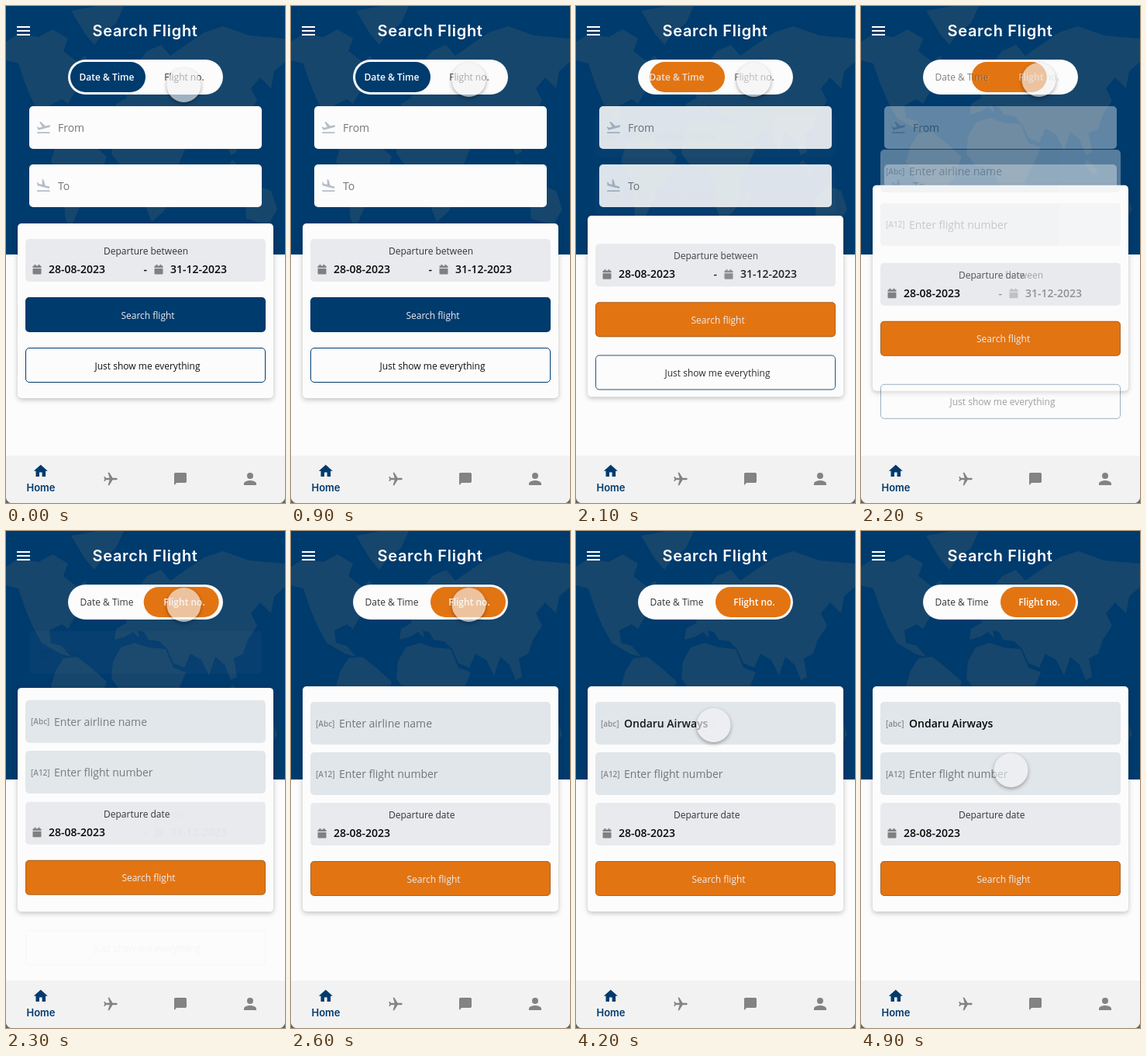
These frames come from a looping animation (360 px wide and 640 px high, 5 s). An HTML page:

```html
<!DOCTYPE html>
<html lang="en">
<head>
<meta charset="utf-8">
<title>Search Flight</title>
<style>
  html, body { margin: 0; width: 100%; height: 100%; overflow: hidden; background: #666; }
  #stage { position: relative; width: 360px; height: 640px; overflow: hidden; }
  svg { display: block; border-radius: 0 0 8px 8px; }
  text { font: 12px "Open Sans", sans-serif; fill: #333; white-space: pre; }
  .mid { text-anchor: middle; }
  .title { font: 600 20px Inter, sans-serif; letter-spacing: .7px; fill: #fff; }
  .home { font: 600 13px Inter, sans-serif; fill: #003b6d; }
  .field { font-size: 14px; fill: #747678; }
  .value { font-size: 14px; font-weight: 600; fill: #080808; }
  .tag { font-size: 10px; font-weight: 600; fill: #85898d; }
  .active { font-weight: 600; fill: #fff; }
  .light { fill: #e9eef3; }
  .dark { fill: #111; }
  .raised { filter: drop-shadow(0 2px 3px rgba(0, 0, 0, .24)); }
  #touch {
    position: absolute; left: -22px; top: -22px; width: 44px; height: 44px; border-radius: 50%;
    background: rgba(244, 244, 246, .62); box-shadow: 0 2px 5px rgba(0, 0, 0, .34);
  }
</style>
</head>
<body>
<div id="stage">
<svg width="360" height="640" viewBox="0 0 360 640">
  <defs>
    <g id="calendar" fill="#808080">
      <path d="M1 1.500h1V0h2v1.500h3V0h2v1.500h1q1 0 1 1V4H0V2.500q0-1 1-1zM0 5h11v6.500q0 1-1 1H1q-1 0-1-1z"/>
    </g>
  </defs>

  <rect width="360" height="640" fill="#fcfcfc"/>
  <rect width="360" height="320" fill="#003b6d"/>
  <g fill="#17466c">
    <path d="M0 46L16 36 42 40 60 30 80 42 74 58 92 72 102 64 114 84 98 98 88 112 80 126 72 120 56 128 58 144 72 148 84 162 70 158 46 144 34 122 24 98 16 74 0 70z"/>
    <path d="M84 6L118 0 152 0 142 22 124 36 114 50 102 36z"/>
    <path d="M74 164L92 162 112 178 130 194 120 222 104 240 92 266 82 290 76 270 74 230 58 200 64 180z"/>
    <path d="M148 150L166 144 184 150 206 152 216 176 232 182 222 206 212 224 214 242 204 264 188 278 180 258 178 228 168 208 148 206 136 190 138 168z"/>
    <path d="M140 140L142 126 156 118 152 106 164 102 174 90 168 76 182 58 200 50 212 64 232 50 256 34 280 26 314 38 360 42 360 72 346 84 342 106 328 92 316 106 324 122 312 140 306 158 294 164 298 188 290 192 282 172 270 162 262 186 252 166 238 158 230 176 216 170 208 152 198 142 184 140 178 130 170 128 172 138 164 130 154 136z"/>
    <path d="M150 84L158 78 162 96 152 100zM292 198L306 212 300 218 288 204zM220 234L226 232 222 256 216 260zM308 246L326 232 342 238 350 262 338 282 310 274z"/>
  </g>

  <path d="M14 27h17M14 32h17M14 37h17" stroke="#fff" stroke-width="2"/>
  <text class="title" x="111.500" y="39">Search Flight</text>

  <rect x="80" y="69" width="200" height="45" rx="22.500" fill="#fcfcfc"/>
  <rect id="pill" y="72" width="97" height="39" rx="19.500"/>
  <g class="byDate">
    <text class="mid active" x="130" y="95.500">Date &amp; Time</text>
    <text class="mid" x="230" y="95.500">Flight no.</text>
  </g>
  <g class="byNumber">
    <text class="mid" x="130" y="95.500">Date &amp; Time</text>
    <text class="mid active" x="230" y="95.500">Flight no.</text>
  </g>

  <g class="byDate">
    <rect x="30" y="129" width="300" height="55" rx="5" fill="#fcfcfc"/>
    <rect x="30" y="204" width="300" height="55" rx="5" fill="#fcfcfc"/>
    <g fill="#b5bdc7">
      <path transform="translate(38 146) scale(.86)" d="M2.500 19h19v2h-19zm19.570-9.360c-.210-.800-1.040-1.280-1.840-1.060L14.920 10l-6.900-6.430-1.930.510 4.140 7.170-4.970 1.330-1.970-1.540-1.450.390 2.590 4.490L21 11.490c.810-.230 1.280-1.050 1.070-1.850z"/>
      <path transform="translate(38 221) scale(.86)" d="M2.500 19h19v2h-19zM14.020 14.700l5.310 1.420c.800.210 1.620-.260 1.840-1.060.210-.800-.260-1.620-1.060-1.840l-5.310-1.420-2.760-9.020L10.120 2.300v8.280L5.150 9.250l-.930-2.320-1.450-.390v5.170z"/>
    </g>
    <text class="field" x="67" y="162">From</text>
    <text class="field" x="67" y="237">To</text>
  </g>

  <rect id="card" class="raised" x="15" width="330" rx="5" fill="#fcfcfc"/>

  <g id="airline">
    <rect x="25" width="310" height="55" rx="5" fill="#e1e6ea"/>
    <g id="prompt">
      <text class="tag" x="32" y="31.500">[Abc]</text>
      <text class="field" x="62" y="33">Enter airline name</text>
    </g>
    <g id="answer">
      <text class="tag" x="32" y="31.500">[abc]</text>
      <text class="value" x="62" y="33">Ondaru Airways</text>
    </g>
  </g>
  <g id="number">
    <rect x="25" width="310" height="55" rx="5" fill="#e1e6ea"/>
    <text class="tag" x="32" y="31.500">[A12]</text>
    <text class="field" x="62" y="33">Enter flight number</text>
  </g>

  <g id="departure">
    <rect x="25" width="310" height="55" rx="5" fill="#e9eaee"/>
    <text class="byDate" x="126" y="20">Departure between</text>
    <text class="byNumber" x="126" y="20">Departure date</text>
    <use href="#calendar" x="34.500" y="33"/>
    <text class="value" x="55" y="44">28-08-2023</text>
    <g class="byDate">
      <text class="value" x="177.500" y="44">-</text>
      <use href="#calendar" x="191.500" y="33"/>
      <text class="value" x="212" y="44">31-12-2023</text>
    </g>
  </g>

  <g id="search">
    <rect id="searchFill" x="25" width="310" height="45" rx="5"/>
    <rect x="25.500" y=".5" width="309" height="44" rx="4.500" fill="none" stroke="#003b6d" stroke-opacity=".25"/>
    <text id="searchText" class="mid light" y="27.500">Search flight</text>
  </g>
  <g id="everything" class="byDate">
    <rect x="25.500" y=".5" width="309" height="44" rx="4.500" fill="#fcfcfc" stroke="#003b6d"/>
    <text class="mid dark" x="182.500" y="27.500">Just show me everything</text>
  </g>

  <rect y="579" width="360" height="61" fill="#f2f2f2"/>
  <g fill="#838383">
    <path fill="#003b6d" transform="translate(34 588) scale(.9)" d="M10 20v-6h4v6h5v-8h3L12 3 2 12h3v8z"/>
    <path transform="translate(135 609) rotate(90) scale(.87) translate(-11.500 -12)" d="M21 16v-2l-8-5V3.500c0-.830-.670-1.500-1.500-1.500S10 2.670 10 3.500V9l-8 5v2l8-2.500V19l-2 1.500V22l3.500-1 3.500 1v-1.500L13 19v-5.500l8 2.500z"/>
    <path transform="translate(215.400 599.500) scale(.8)" d="M20 2H4c-1.100 0-2 .900-2 2v18l4-4h14c1.100 0 2-.900 2-2V4c0-1.100-.900-2-2-2z"/>
    <path transform="translate(303 597)" d="M12 12a4 4 0 1 0 0-8 4 4 0 0 0 0 8zm0 2c-2.670 0-8 1.340-8 4v2h16v-2c0-2.660-5.330-4-8-4z"/>
  </g>
  <text class="home mid" x="45" y="624.500">Home</text>
</svg>
<div id="touch"></div>
</div>

<script>
const LOOP = 5000, TICK = 100, FADE = 310;
const SWITCH_AT = 2024, ANSWER_AT = 3950;
const BLUE = '#003b6d', ORANGE = '#e37412';

// time, x, y, scale (the touch shrinks slightly while pressing)
const TOUCH_PATH = [
  [0, 229.5, 102, 1], [200, 229.5, 95, 1], [1700, 229.5, 95, 1],
  [1900, 229.5, 95, .95], [2100, 229.5, 95, 1], [2600, 229.5, 95, 1],
  [3200, 171.5, 231, 1], [3450, 171.5, 231, 1], [3900, 177.5, 250, 1],
  [4200, 177.5, 250, 1], [4900, 193.5, 308, 1]
];

const $ = id => document.getElementById(id);
const lerp = (a, b, p) => a + (b - a) * p;

// cubic-bezier(.42, 0, .58, 1)
function easeInOut(x) {
  let lo = 0, hi = 1;
  for (let i = 0; i < 20; i++) {
    const s = (lo + hi) / 2, r = 1 - s;
    if (1.26 * s * r * r + 1.74 * s * s * r + s * s * s < x) lo = s; else hi = s;
  }
  return lo * lo * (3 - 2 * lo);
}
const fade = (t, start) => t <= start ? 0 : t >= start + FADE ? 1 : easeInOut((t - start) / FADE);

function touchAt(t) {
  const next = TOUCH_PATH.findIndex(key => key[0] > t);
  if (next < 0) return TOUCH_PATH[TOUCH_PATH.length - 1];
  const from = TOUCH_PATH[next - 1], to = TOUCH_PATH[next];
  const p = easeInOut((t - from[0]) / (to[0] - from[0]));
  return from.map((value, i) => lerp(value, to[i], p));
}

const setOpacity = (selector, value) =>
  document.querySelectorAll(selector).forEach(el => el.setAttribute('opacity', value));
const setY = (id, y) => $(id).setAttribute('transform', `translate(0 ${y})`);

function render(t) {
  const p = fade(t, SWITCH_AT);
  const accent = t > SWITCH_AT ? ORANGE : BLUE;

  setOpacity('.byDate', 1 - p);
  setOpacity('.byNumber', p);
  setOpacity('#airline, #number', p * p);

  $('pill').setAttribute('x', lerp(83, 180, p));
  $('pill').setAttribute('fill', accent);
  $('searchFill').setAttribute('fill', accent);
  $('searchText').setAttribute('x', lerp(183, 184, p));

  const top = lerp(280, 200, p);
  $('card').setAttribute('y', top);
  $('card').setAttribute('height', lerp(505, 490, p) - top);
  setY('airline', lerp(129, 220, p));
  setY('number', lerp(204, 285, p));
  setY('departure', lerp(300, 350, p));
  setY('search', lerp(375, 425, p));
  setY('everything', lerp(440, 516, p));

  const answered = fade(t, ANSWER_AT);
  setOpacity('#prompt', 1 - answered);
  setOpacity('#answer', answered);

  const [, x, y, scale] = touchAt(t);
  $('touch').style.transform = `translate(${x}px, ${y}px) scale(${scale})`;
}

const start = performance.now();
function frame() {
  const t = (performance.now() - start) % LOOP;
  render(Math.floor(t / TICK) * TICK);
  requestAnimationFrame(frame);
}
frame();
</script>
</body>
</html>
```
